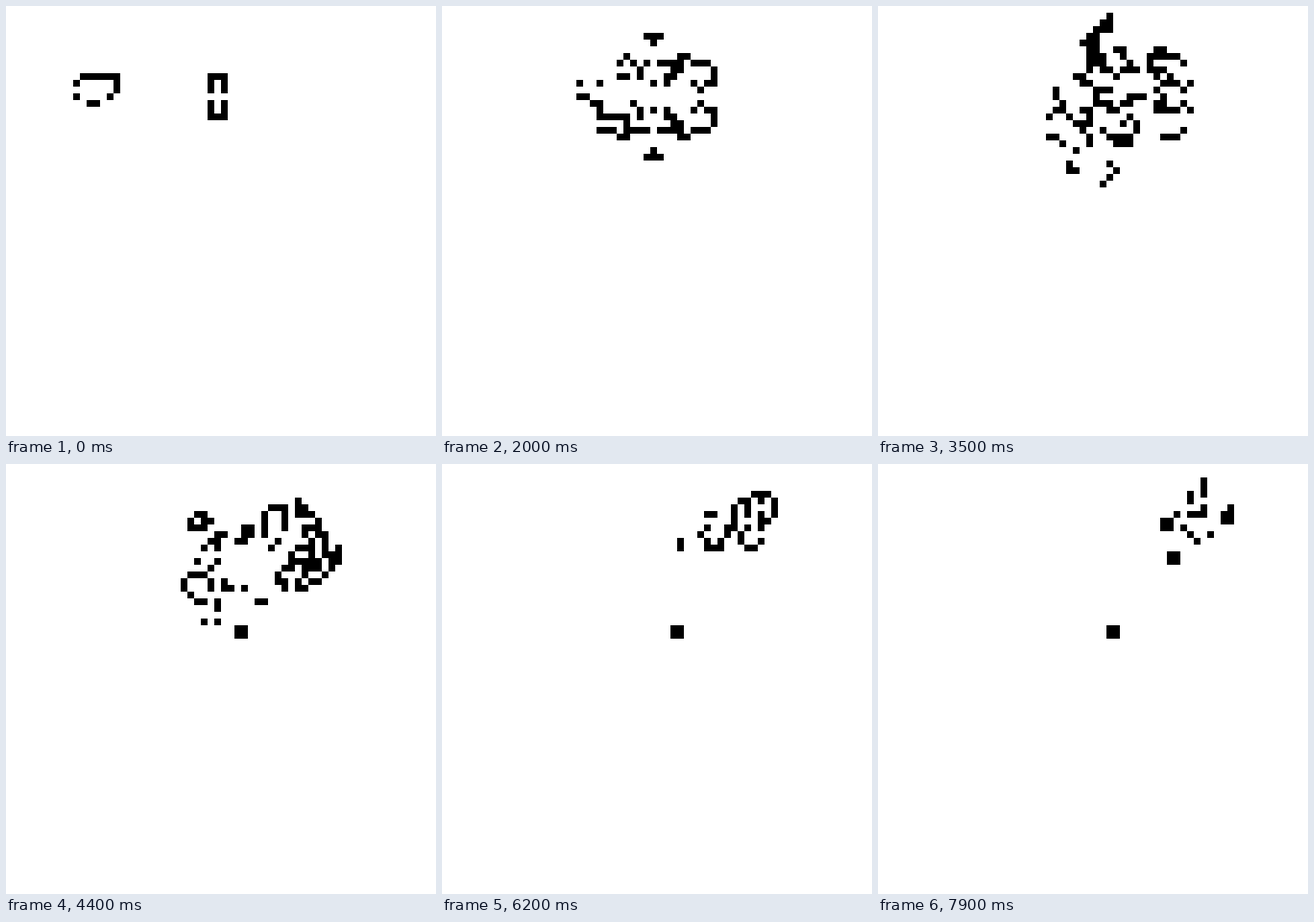
Recreate the animation shown at these times as an HTML page with a canvas. Size 512 by 512 pixels, loop 8000 ms.

```html
<!DOCTYPE html>
<html lang="en">
<head>
<meta charset="utf-8">
<title>Game of Life</title>
<style>
  html, body { margin: 0; width: 100%; height: 100%; overflow: hidden; background: #fff; }
  canvas { display: block; width: 512px; height: 512px; }
</style>
</head>
<body>
<canvas id="stage" width="512" height="512"></canvas>
<script>
const SIZE = 64, CELL = 8, STEP = 100, STEPS = 80;
const ctx = document.getElementById("stage").getContext("2d");

const ship = [
  ".OOOOOO",
  "O.....O",
  "......O",
  "O....O.",
  "..OO..."
];
const seed = ["OOO", "O.O", "O.O", "...", "O.O", "O.O", "OOO"];

function place(grid, pattern, col, row) {
  pattern.forEach((line, y) => [...line].forEach((c, x) => {
    if (c === "O") grid[(row + y) * SIZE + col + x] = 1;
  }));
}

function evolve(grid) {
  const at = (x, y) => grid[((y + SIZE) % SIZE) * SIZE + (x + SIZE) % SIZE];
  return grid.map((alive, i) => {
    const x = i % SIZE, y = Math.floor(i / SIZE);
    let sum = -alive;
    for (let dy = -1; dy <= 1; dy++)
      for (let dx = -1; dx <= 1; dx++) sum += at(x + dx, y + dy);
    return sum === 3 || (alive && sum === 2) ? 1 : 0;
  });
}

// All generations are worked out once, so the picture depends on time alone.
const first = new Uint8Array(SIZE * SIZE);
place(first, ship, 10, 10);
place(first, seed, 30, 10);
const generations = [first];
while (generations.length < STEPS) generations.push(evolve(generations.at(-1)));

function draw(index) {
  ctx.fillStyle = "#fff";
  ctx.fillRect(0, 0, 512, 512);
  ctx.fillStyle = "#000";
  generations[index].forEach((alive, i) => {
    if (alive) ctx.fillRect(i % SIZE * CELL, Math.floor(i / SIZE) * CELL, CELL, CELL);
  });
}

let shown = 0;
const start = performance.now();
function tick() {
  const elapsed = Math.max(0, performance.now() - start);
  const index = Math.floor(elapsed / STEP) % STEPS;
  if (index !== shown) draw(shown = index);
  requestAnimationFrame(tick);
}
draw(0);
requestAnimationFrame(tick);
</script>
</body>
</html>
```
